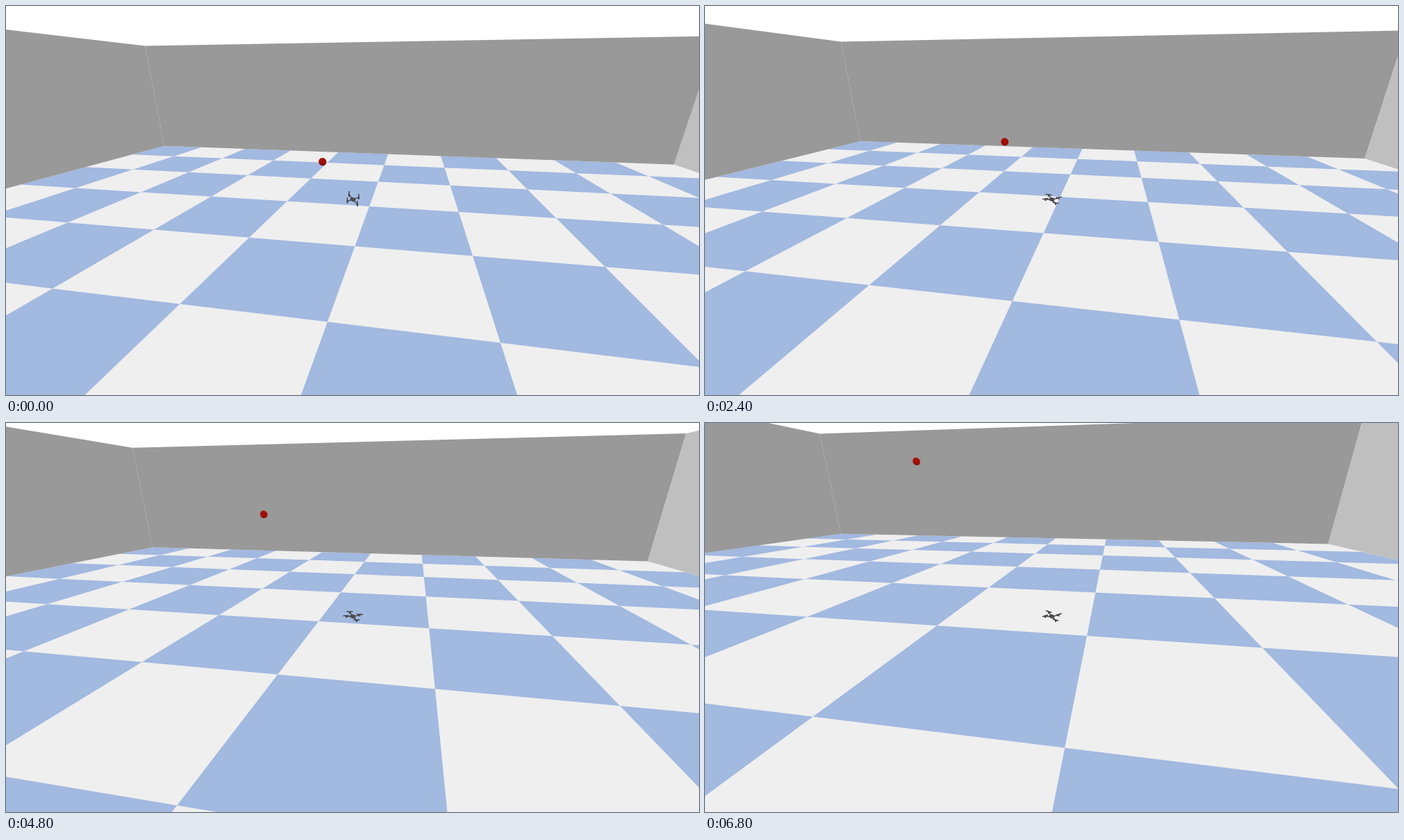
Write an HTML page with a canvas that moves like this. It is 998 px wide and 561 px high and loops after 6900 ms.

```html
<!DOCTYPE html>
<html lang="en">
<head>
<meta charset="utf-8">
<title>Drone in a walled room</title>
<style>
  html, body { margin: 0; width: 100%; height: 100%; overflow: hidden; background: #fff; }
  canvas { display: block; width: 100vw; height: 100vh; }
</style>
</head>
<body>
<canvas id="stage" width="998" height="561"></canvas>
<script>
const W = 998, H = 561, STEP = 100, STEPS = 69;
const ctx = document.getElementById('stage').getContext('2d');

// Camera: 60 degree vertical field of view, 20 degrees down, turned by 10 degrees
const rad = deg => deg * Math.PI / 180;
const FOCAL = H / 2 / Math.tan(rad(30));
const cosP = Math.cos(rad(20)), sinP = Math.sin(rad(20));
const cosY = Math.cos(rad(10)), sinY = Math.sin(rad(10));
const NEAR = 0.05;
const ROOM = 4.9, WALL = 2, BALL = 0.02;

const cubic = (t, a, b, c) => t * (a + t * (b + t * c));
const mix = (a, b, w) => a + (b - a) * w;

function cameraAt(t) {
  return {
    x: 0.4425 + cubic(t, 0.00295, 0.01902, -0.000712),
    y: -1.63 - cubic(t, 0.0139, 0.00766, -0.00046),
    z: 1.402 - cubic(t, 0.0087, 0.01127, 0)
  };
}

function toView(cam, [x, y, z]) {
  const dx = x - cam.x, dy = y - cam.y, drop = cam.z - z;
  const ahead = dy * cosY - dx * sinY;
  return [dx * cosY + dy * sinY, drop * cosP - ahead * sinP, ahead * cosP + drop * sinP];
}

const toScreen = ([x, y, z]) => [W / 2 + FOCAL * x / z, H / 2 + FOCAL * y / z];

function clipNear(points) {
  const out = [];
  points.forEach((p, i) => {
    const q = points[(i + 1) % points.length];
    if (p[2] >= NEAR) out.push(p);
    if ((p[2] >= NEAR) !== (q[2] >= NEAR)) {
      const w = (NEAR - p[2]) / (q[2] - p[2]);
      out.push(p.map((v, n) => mix(v, q[n], w)));
    }
  });
  return out;
}

function face(cam, color, ...corners) {
  const points = clipNear(corners.map(p => toView(cam, p))).map(toScreen);
  if (points.length < 3) return;
  ctx.beginPath();
  points.forEach(([x, y]) => ctx.lineTo(x, y));
  ctx.closePath();
  ctx.fillStyle = color;
  ctx.fill();
}

function floorTile(cam, color, x0, y0, x1, y1) {
  face(cam, color, [x0, y0, 0], [x1, y0, 0], [x1, y1, 0], [x0, y1, 0]);
}

function wall(cam, color, x0, y0, x1, y1) {
  face(cam, color, [x0, y0, 0], [x1, y1, 0], [x1, y1, WALL], [x0, y0, WALL]);
}

function drawRoom(cam) {
  const R = ROOM, limit = v => Math.max(-R, Math.min(R, v));
  floorTile(cam, '#efefef', -R, -R, R, R);
  for (let i = -5; i < 5; i++)
    for (let j = -5; j < 5; j++)
      if ((i + j) % 2) floorTile(cam, '#a2b9e0', limit(i), limit(j), limit(i + 1), limit(j + 1));
  wall(cam, '#999', -R, -R, -R, R);
  wall(cam, '#999', -R, R, R, R);
  wall(cam, '#bfbfbf', R, R, R, -R);
}

function drawBall(cam) {
  const p = toView(cam, [0, 0, 1]);
  const [x, y] = toScreen(p);
  const r = FOCAL * BALL / p[2];
  const stretch = Math.hypot(...p) / p[2];
  const shade = ctx.createLinearGradient(-r, -r, r, r);
  const turn = Math.atan2(p[1], p[0]);
  shade.addColorStop(0, '#7c0b06');
  shade.addColorStop(0.45, '#a00f08');
  shade.addColorStop(1, '#ab1109');
  ctx.save();
  ctx.translate(x, y);
  ctx.rotate(turn);
  ctx.scale(stretch, 1);
  ctx.beginPath();
  ctx.arc(0, 0, r, 0, 2 * Math.PI);
  ctx.fillStyle = shade;
  ctx.fill();
  ctx.restore();
}

// Rotor hubs around the body, on take-off and in level flight
const START = [[-5.5, -7], [8.5, -3], [-8, 2.5], [6.5, 7]];
const LEVEL = [[-4.5, -6], [10, -2], [-9.5, 0], [5.5, 6]];
const SPIN = [[0, 90], [16, 15], [32, 10], [40, 90], [48, 0], [56, 5], [68, 25]];

function spinAt(step) {
  const n = Math.max(1, SPIN.findIndex(([k]) => k >= step));
  const [k0, a0] = SPIN[n - 1], [k1, a1] = SPIN[n];
  return mix(a0, a1, (step - k0) / (k1 - k0)) + 135 * step;
}

function line(x0, y0, x1, y1, width, color) {
  ctx.beginPath();
  ctx.moveTo(x0, y0);
  ctx.lineTo(x1, y1);
  ctx.lineWidth = width;
  ctx.strokeStyle = color;
  ctx.stroke();
}

function drawDrone(step) {
  const level = Math.min(1, step / 4), spin = rad(spinAt(step));
  ctx.save();
  ctx.translate(499.5, 279);
  LEVEL.forEach((hub, i) => {
    const x = mix(START[i][0], hub[0], level), y = mix(START[i][1], hub[1], level);
    const angle = i % 3 ? -spin : spin;
    const dx = 4.5 * Math.cos(angle), dy = mix(4, 3, level) * Math.sin(angle);
    line(0, 0, x, y, 1.7, '#555');
    line(x, y - 1, x, y + 2, 2, '#484848');
    line(x - dx, y - 1 - dy, x + dx, y - 1 + dy, 1.4, '#3a3a3a');
  });
  ctx.beginPath();
  ctx.ellipse(0, 0, 4, 2.8, 0.25, 0, 2 * Math.PI);
  ctx.fillStyle = '#4c4c4c';
  ctx.fill();
  ctx.restore();
}

function draw(now) {
  const step = Math.floor(now / STEP) % STEPS;
  const cam = cameraAt(step * STEP / 1000);
  ctx.fillStyle = '#fff';
  ctx.fillRect(0, 0, W, H);
  drawRoom(cam);
  drawBall(cam);
  drawDrone(step);
}

const start = performance.now();
function tick() {
  draw(performance.now() - start);
  requestAnimationFrame(tick);
}
tick();
</script>
</body>
</html>
```
